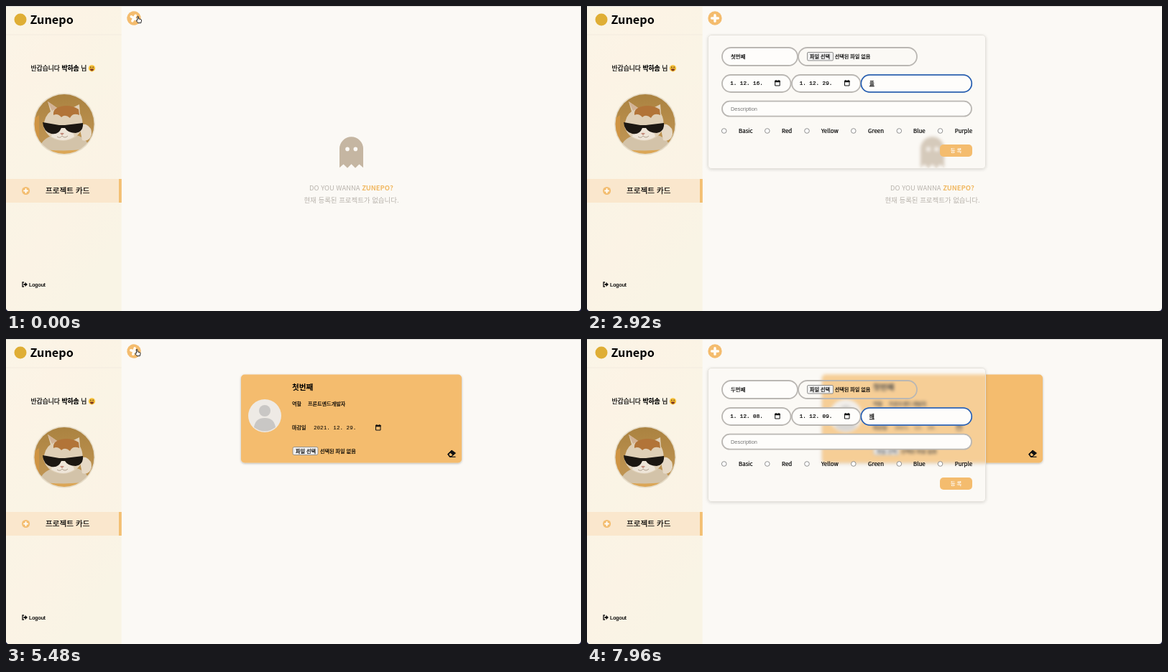
Write an HTML page that moves like this. It is 800 px wide and 425 px high and loops after 8 s.

```html
<!DOCTYPE html>
<html lang="ko">
<head>
<meta charset="utf-8">
<title>Project cards</title>
<style>
  html, body { margin: 0; width: 100%; height: 100%; overflow: hidden; background: #1b1a3c; }
  #stage { position: relative; width: 800px; height: 425px; overflow: hidden; }
  svg { position: absolute; left: 0; top: 0; }
  #glass {
    position: absolute; left: 168px; top: 40px; width: 387px; height: 187px; box-sizing: border-box;
    border: 1px solid #e5e2dc; border-radius: 5px; background: rgba(251, 249, 244, .3);
    box-shadow: 0 1px 4px rgba(0, 0, 0, .14); backdrop-filter: blur(2.2px);
  }
  text { font-family: "Noto Sans CJK KR", "Noto Sans CJK JP", "Noto Sans CJK", "Noto Sans", sans-serif; white-space: pre; }
  .arial { font-family: "Liberation Sans", "Noto Sans CJK KR", sans-serif; }
  .mono { font-family: "Liberation Mono", "Noto Sans CJK KR", monospace; }
  .medium { stroke: #000; stroke-width: .22; }
</style>
</head>
<body>
<div id="stage">
  <svg id="back" width="800" height="425"></svg>
  <div id="glass"></div>
  <svg id="front" width="800" height="425"></svg>
</div>
<script>
const LOOP = 8000;
const AMBER = '#f4bc6e';
const $ = id => document.getElementById(id);

const text = (x, y, size, str, attrs = 'class="medium"') =>
  `<text x="${x}" y="${y}" font-size="${size}" ${attrs}>${str}</text>`;
const rect = (x, y, w, h, r, fill, attrs = '') =>
  `<rect x="${x}" y="${y}" width="${w}" height="${h}" rx="${r}" fill="${fill}" ${attrs}/>`;
const circle = (x, y, r, fill, attrs = '') =>
  `<circle cx="${x}" cy="${y}" r="${r}" fill="${fill}" ${attrs}/>`;
const path = (d, fill, attrs = '') => `<path d="${d}" fill="${fill}" ${attrs}/>`;
const plus = (r, color) => circle(0, 0, r, color) +
  path(`M${-r * .45} 0H${r * .45}M0 ${-r * .45}V${r * .45}`, 'none',
    `stroke="#fffdf8" stroke-width="${r * .36}" stroke-linecap="round"`);

/* ---------- static scenery ---------- */
const catPhoto = `<g clip-path="url(#avatar)"><g filter="url(#photo)">
  ${rect(34, 118, 94, 94, 0, 'url(#wall)')}
  ${path('M34 160L46 152V212H34Z', '#cf9443')}
  ${path('M44 202Q50 184 66 180H98Q114 184 117 202Z', '#d3c3a9')}
  ${path('M52 168Q54 152 62 147L58 133L71 142Q82 138 92 142L102 137L103 150Q108 158 106 170Q100 186 80 188Q58 187 52 168Z', '#dfcfb6')}
  ${path('M63 182Q66 168 78 168Q92 168 95 182Q80 192 63 182Z', '#eee5d8')}
  ${path('M66 152Q65 142 76 140Q90 137 101 144L102 152Q93 148 89 156Q82 150 77 155Q72 149 66 152Z', '#b27438')}
  ${path('M58 133L64 146L71 142Z', '#d2b295')}
  ${path('M103 172Q103 163 111 165Q120 169 119 179Q116 190 106 187Z', '#e6d9c6')}
  ${path('M51 162L74 166L82 166L107 163Q108 175 97 177Q86 177 82 170H77Q73 180 63 178Q52 175 51 162Z', '#1c1712')}
  ${path('M75 177.5Q78 176 81 177.5L78 180Z', '#c18a7a')}
  ${path('M71 182Q75 185 78 181Q82 185 86 181', 'none', 'stroke="#a08f7b" stroke-width=".8"')}
  ${path('M34 197Q80 206 128 197V212H34Z', '#dba656')}
</g></g>`;

const sidebar = `
  ${rect(0, 0, 160.6, 425, 0, 'url(#side)')}
  ${rect(0, 39.5, 160.6, 1, 0, '#f3ecdf')}
  ${circle(20, 19, 8.5, '#dfae35')}
  ${text(33.5, 25, 16.2, 'Zunepo', 'font-weight="700"')}
  ${text(34.5, 90, 8.8, '반갑습니다 <tspan font-weight="700">박하솜</tspan> 님')}
  ${circle(119.5, 86.8, 4.6, '#f7c136')}
  ${circle(117.9, 85.4, .8, '#553018')}${circle(121.1, 85.4, .8, '#553018')}
  ${path('M116.7 87.6H122.3Q121.6 90.6 119.5 90.6T116.7 87.6Z', '#7c3423')}
  ${circle(81, 164.5, 43, '#e6dcc8')}
  ${catPhoto}
  ${rect(0, 241, 157, 33, 0, '#fae7cd')}
  ${rect(157, 241, 3.8, 33, 0, '#f3bf72')}
  <g transform="translate(27.6 257.5)">${plus(5.5, '#f3bd70')}</g>
  ${text(55, 261, 10.6, '프로젝트 카드')}
  ${path('M25 385H23V391H25', 'none', 'stroke="#111" stroke-width="1.3"')}
  ${path('M24.5 387H26.5V384.7L30 388L26.5 391.3V389H24.5Z', '#111')}
  ${text(32, 390.6, 7.5, 'Logout', 'class="arial medium"')}`;

const ghost = `
  ${path('M464 225.2V198.8A16.5 16.5 0 0 1 497 198.8V225.2L491.5 220.5L486 225.7L480.5 220.2L475 225.7L469.5 220.5Z', '#c5b6a2')}
  ${circle(475, 199.4, 2.8, '#fbf9f5')}${circle(486.3, 199.4, 2.8, '#fbf9f5')}`;

const emptyState = `<g id="empty">${ghost}
  ${text(480.5, 257, 9.4, 'DO YOU WANNA <tspan font-weight="700" fill="#f1b963">ZUNEPO?</tspan>', 'fill="#b8b3ac" text-anchor="middle"')}
  ${text(480.5, 274, 9.45, '현재 등록된 프로젝트가 없습니다.', 'fill="#b8b3ac" text-anchor="middle"')}
</g>`;

const calendar = (x, y) => path(`M${x + .5} ${y + 1.5}H${x + 7}V${y + 8}H${x + .5}Z`, 'none', 'stroke="#111"') +
  rect(x, y + .8, 7.5, 2.4, .5, '#111') + path(`M${x + 1.8} ${y}v1.5M${x + 5.7} ${y}v1.5`, 'none', 'stroke="#111"');

const card = `<g id="card">
  ${rect(327, 49.5, 307, 123, 5, AMBER, 'filter="url(#soft)"')}
  ${circle(360, 107, 23, '#eeeae5')}
  ${circle(360, 100, 8, '#c9c7c5')}
  ${path('M345 123Q347 110 360 110T375 123Q360 134 345 123Z', '#c9c7c5')}
  ${text(398, 70.5, 10.6, '첫번째', 'font-weight="700"')}
  ${text(398, 92.5, 7.1, '역할')}${text(420, 92.5, 7.1, '프론트엔드개발자')}
  ${text(398, 125.5, 7.1, '마감일')}${text(428, 125.5, 7.6, '2021. 12. 29.', 'class="mono"')}
  ${calendar(514, 119)}
  ${rect(399, 150.5, 35, 11, 2, '#efefef', 'stroke="#777" stroke-width=".7"')}
  ${text(403, 158.7, 7.1, '파일 선택')}${text(437, 158.7, 7.1, '선택된 파일 없음')}
  ${path('M614.5 160.5L620 155L625.5 159L619.5 164H617Z', '#111', 'stroke="#111" stroke-linejoin="round"')}
  ${path('M616.4 160.6L618.3 158.7L621.2 161.6L619.4 163.1H617.6Z', AMBER)}
  ${path('M617 164.3H625.5', 'none', 'stroke="#111" stroke-width="1.2"')}
</g>`;

$('back').innerHTML = `<defs>
    <linearGradient id="side" x2=".5" y2="1">
      <stop stop-color="#faf5e7"/><stop offset=".25" stop-color="#fcf3e5"/><stop offset=".5" stop-color="#faf4e5"/>
      <stop offset=".75" stop-color="#fbf3e5"/><stop offset="1" stop-color="#f9f4e5"/>
    </linearGradient>
    <linearGradient id="wall" x2="0" y2="1"><stop stop-color="#a9813f"/><stop offset="1" stop-color="#c69a58"/></linearGradient>
    <clipPath id="avatar"><circle cx="81" cy="164.5" r="41.5"/></clipPath>
    <clipPath id="window"><path d="M0 0H800V420Q800 425 795 425H5Q0 425 0 420Z"/></clipPath>
    <filter id="soft"><feDropShadow dx="0" dy="1" stdDeviation="1.5" flood-opacity=".28"/></filter>
    <filter id="photo"><feGaussianBlur stdDeviation=".7"/></filter>
  </defs>
  <g clip-path="url(#window)">
    ${rect(0, 0, 800, 425, 0, '#fbf9f5')}${sidebar}${emptyState}${card}
    ${rect(0, 0, 800, 1, 0, '#dcdad8')}
    <g id="opener">${plus(9.7, AMBER)}</g>
  </g>`;

/* ---------- form ---------- */
const FIELDS = {
  name: [188, 58, 105, 25],
  file: [294, 58, 165, 25],
  from: [188, 96, 95.5, 24],
  to: [285, 96, 95.5, 24],
  role: [381.3, 96, 154, 24],
  desc: [188, 132.7, 347, 21]
};
const pill = ([x, y, w, h], fill, attrs) => rect(x, y, w, h, h / 2, fill, attrs);
const frames = Object.entries(FIELDS).map(([key, box]) =>
  pill(box, key === 'file' ? 'none' : '#fefdfb', 'stroke="#bab7b3" stroke-width="1.8"')).join('');
const colors = [['Basic', 190.7, 211], ['Red', 250.8, 271], ['Yellow', 306, 326],
  ['Green', 370.8, 391], ['Blue', 434.3, 454], ['Purple', 491.5, 511.7]];
const radios = colors.map(([label, dot, x]) =>
  circle(dot, 174, 3.3, '#fff', 'stroke="#777" stroke-width=".8"') +
  text(x, 176.6, 7.9, label)).join('');

$('front').innerHTML = `<defs>
    <clipPath id="clipFrom"><rect x="199.5" y="97" width="60" height="22"/></clipPath>
    <clipPath id="clipTo"><rect x="296" y="97" width="60" height="22"/></clipPath>
  </defs>
  <g id="form">${frames}
    <rect id="focus" fill="none" stroke="#1f5dba" stroke-width="1.5"/>
    ${rect(306.5, 64.5, 36, 11.5, 1.5, '#efefef', 'stroke="#767676" stroke-width=".8"')}
    ${text(310, 73, 7.1, '파일 선택')}${text(344.7, 73, 7.1, '선택된 파일 없음')}
    <rect id="yearMark" x="199.5" y="103" width="4.5" height="10" fill="#a9cdf6"/>
    <g clip-path="url(#clipFrom)">${text(0, 110.4, 7.6, '', 'id="from" class="mono medium"')}</g>
    <g clip-path="url(#clipTo)">${text(0, 110.4, 7.6, '', 'id="to" class="mono medium"')}</g>
    ${calendar(261.2, 103)}${calendar(358, 103)}
    ${text(200, 73.2, 7.4, '', 'id="name"')}
    ${text(393, 110.4, 7.4, '', 'id="role"')}
    ${text(200, 145.6, 7.4, '', 'id="desc"')}
    ${radios}
    ${circle(306, 174, 1.9, '#1a73e8', 'id="picked"')}
    ${rect(491, 193, 45, 17, 5, AMBER)}
    ${text(513.5, 204.2, 7.3, '등 록', 'fill="#fff" stroke="#fff" stroke-width=".2" text-anchor="middle"')}
  </g>
  <g id="cursor" stroke-linejoin="round">
    ${path('M0 0V8.2L1.9 6.5L3.3 9.6L4.7 9L3.3 6H5.8Z', '#000', 'id="arrow" stroke="#fff" stroke-width=".6"')}
    ${path('M-1.8 -4.5Q0 -4.5 0 -3.5Q0 -4.5 1.8 -4.5M0 -3.5V3.5M-1.8 4.5Q0 4.5 0 3.5Q0 4.5 1.8 4.5M-1 .8H1', 'none', 'id="beam" stroke="#222" stroke-width=".9"')}
    ${path('M-1.6 -4.4Q-.6 -5 0 -4V-1.2L3.4 -.3Q4.2 0 4 1L3.3 4.6H-.9L-3.4 1.2Q-3 .1 -1.6 1Z', '#fff', 'id="hand" stroke="#111" stroke-width=".9"')}
  </g>`;

/* ---------- Hangul input ---------- */
const LEADS = 'ㄱㄲㄴㄷㄸㄹㅁㅂㅃㅅㅆㅇㅈㅉㅊㅋㅌㅍㅎ';
const TAILS = ' ㄱㄲㄳㄴㄵㄶㄷㄹㄺㄻㄼㄽㄾㄿㅀㅁㅂㅄㅅㅆㅇㅈㅊㅋㅌㅍㅎ';

// Every intermediate string an input method shows while a word is typed.
function keystrokes(word) {
  const states = [];
  let done = '', openPrev = false;
  for (const ch of word) {
    const code = ch.charCodeAt(0) - 0xAC00;
    const lead = LEADS[Math.floor(code / 588)];
    const tail = code % 28;
    const asTail = TAILS.indexOf(lead);
    states.push(openPrev && asTail > 0
      ? done.slice(0, -1) + String.fromCharCode(done.charCodeAt(done.length - 1) + asTail)
      : done + lead);
    states.push(done + String.fromCharCode(0xAC00 + code - tail));
    if (tail) states.push(done + ch);
    done += ch;
    openPrev = !tail;
  }
  return states;
}

const typing = (field, word, start, end, clear) => ({ field, states: keystrokes(word), start, end, clear });
const TYPED = [
  typing('name', '첫번째', 740, 1180, 5100),
  typing('role', '프론트엔드개발자', 2830, 3478, 5100),
  typing('desc', '프론트엔드', 3700, 4240, 5100),
  typing('name', '두번째', 5860, 6160, LOOP),
  typing('role', '배', 7870, 7930, LOOP)
];
const HINTS = { name: 'Project Name', role: 'Role', desc: 'Description' };

/* ---------- timeline ---------- */
const FOCUS = [[0, ''], [600, 'name'], [1400, 'from'], [2200, 'to'], [2720, 'role'], [3600, 'desc'],
  [4800, ''], [5780, 'name'], [6440, 'from'], [7080, 'to'], [7720, 'role']];
const FORM = [[0, false], [280, true], [5100, false], [5560, true]];
const FROM = [[0, ''], [1840, '12. 16.'], [5100, ''], [6880, '12. 08.']];
const TO = [[0, ''], [2480, '12. 29.'], [5100, ''], [7440, '12. 09.']];
const POINTER = [
  [0, 184.5, 19, 'hand'], [280, 184.5, 19, 'arrow'], [520, 233, 69.5, 'beam'], [740, 233, 69.5, ''],
  [1200, 233, 69.5, 'arrow'], [1400, 265, 105, 'arrow'], [1560, 265, 105, 'arrow'], [1800, 263, 190, 'arrow'],
  [1960, 263, 190, 'arrow'], [2200, 362, 105, 'arrow'], [2440, 340, 203, 'arrow'], [2520, 340, 203, 'arrow'],
  [2700, 425, 108, 'beam'], [2830, 425, 108, ''], [3480, 425, 108, 'beam'], [3600, 300, 143, 'beam'],
  [3700, 300, 143, ''], [4400, 300, 143, 'arrow'], [4720, 308, 171, 'arrow'], [4840, 308, 171, 'arrow'],
  [5040, 513, 201, 'hand'], [5120, 513, 201, 'arrow'], [5440, 183, 19, 'hand'], [5580, 183, 19, 'arrow'],
  [5760, 235, 70, 'beam'], [5860, 235, 70, ''], [6320, 265, 99, 'arrow'], [6460, 265, 105, 'arrow'],
  [6820, 240, 178, 'arrow'], [6900, 240, 178, 'arrow'], [7080, 362, 105, 'arrow'], [7380, 356, 178, 'arrow'],
  [7460, 356, 178, 'arrow'], [7700, 425, 108, 'beam'], [7870, 425, 108, '']
];

const current = (track, t) => track.filter(([start]) => start <= t).pop()[1];
const ease = p => p * p * (3 - 2 * p);
const progress = (t, a, b) => Math.min(1, Math.max(0, (t - a) / (b - a)));
const show = (id, on) => { $(id).style.display = on ? '' : 'none'; };

function drawField(field, t, focused) {
  const entry = TYPED.find(e => e.field === field && t >= e.start && t < e.clear);
  const el = $(field);
  el.setAttribute('fill', entry ? '#000' : '#757575');
  el.setAttribute('class', entry ? 'arial medium' : 'arial');
  if (!entry) { el.textContent = HINTS[field]; return; }
  const { states, start, end } = entry;
  const value = states[Math.floor(progress(t, start, end) * (states.length - 1))];
  el.innerHTML = focused
    ? `${value.slice(0, -1)}<tspan text-decoration="underline">${value.slice(-1)}</tspan>`
    : value;
}

function drawDate(id, left, value) {
  $(id).setAttribute('x', value ? left - 14 : left - 4.2);
  $(id).textContent = value ? `2021. ${value}` : '연도. 월. 일.';
}

function drawPointer(t) {
  const i = POINTER.findLastIndex(([start]) => start <= t);
  const [t0, x0, y0, kind] = POINTER[i];
  const [t1, x1, y1] = POINTER[i + 1] || [LOOP, x0, y0];
  const p = ease(progress(t, t0, t1));
  $('cursor').setAttribute('transform', `translate(${x0 + (x1 - x0) * p} ${y0 + (y1 - y0) * p})`);
  ['arrow', 'beam', 'hand'].forEach(id => show(id, id === kind));
}

function draw(t) {
  const open = current(FORM, t);
  const focus = current(FOCUS, t);
  const hasCard = t >= 5100;
  show('form', open);
  show('glass', open);
  show('empty', !hasCard);
  show('card', hasCard);

  const turn = t < 2000 ? 30 + 60 * progress(t, 0, 240) : 90 * ease(progress(t, 5400, 5700));
  $('opener').setAttribute('transform', `translate(178 17) rotate(${turn})`);

  show('focus', focus);
  if (focus) {
    const [x, y, w, h] = FIELDS[focus];
    const box = { x, y, width: w, height: h, rx: h / 2 };
    for (const key in box) $('focus').setAttribute(key, box[key]);
  }
  for (const field in HINTS) drawField(field, t, focus === field);
  // The description keeps its composing underline until the form is sent.
  if (focus === '' && t >= 4800 && t < 5100) drawField('desc', t, true);
  drawDate('from', 199.5, current(FROM, t));
  drawDate('to', 296, current(TO, t));
  show('yearMark', focus === 'from');
  show('picked', t >= 4800 && t < 5100);
  drawPointer(t);
}

const begin = performance.now();
function tick() {
  draw((performance.now() - begin) % LOOP);
  requestAnimationFrame(tick);
}
tick();
</script>
</body>
</html>
```
